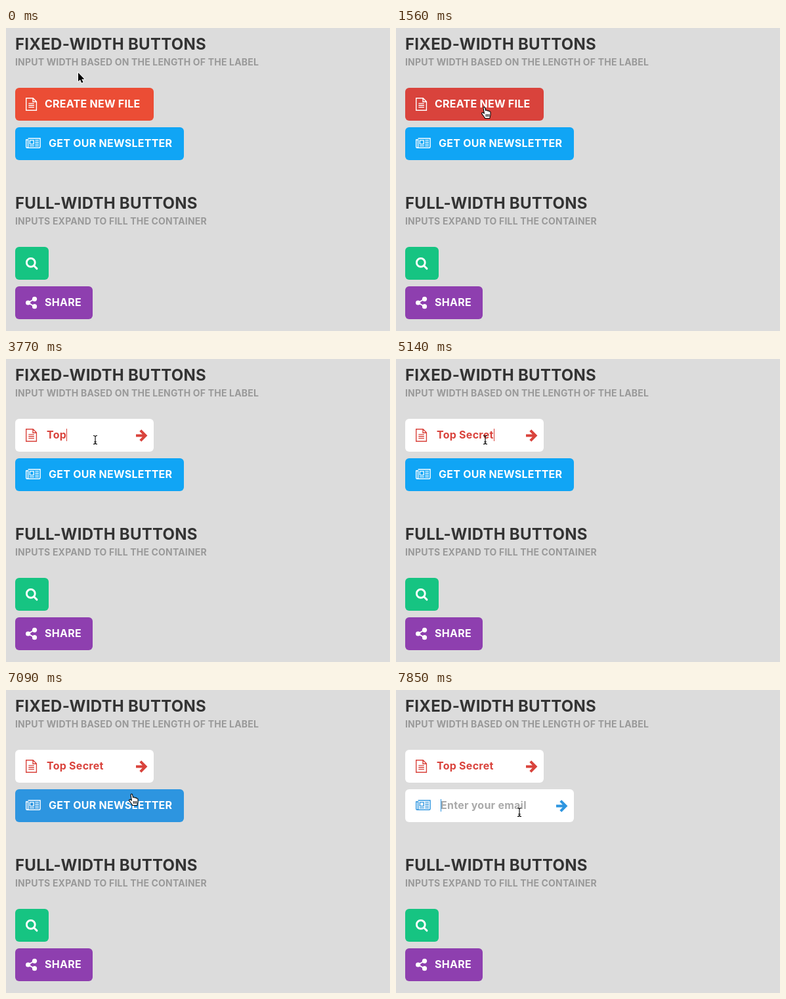
These frames come from a looping animation (585 by 461 pixels, 8000 ms). An HTML page:

```html
<!DOCTYPE html>
<html lang="en">
<head>
<meta charset="utf-8">
<title>Expanding buttons</title>
<style>
  html, body { margin: 0; width: 100%; height: 100%; overflow: hidden; background: #dcdcdc; }
  svg { display: block; }
  text { font: 700 16px Inter, "Open Sans", sans-serif; letter-spacing: .25px; fill: currentColor; white-space: pre; }
  .title { font-size: 24px; color: #333; }
  .sub { font-size: 14px; letter-spacing: .18px; color: #999; }
  .icon { fill: none; stroke: currentColor; stroke-width: 1.4; }
  .arrow { fill: none; stroke: currentColor; stroke-width: 4; }
  .button { color: #fff; }
</style>
</head>
<body>
<svg width="585" height="461" viewBox="0 0 585 461">
  <text class="title" x="14" y="32.5">FIXED-WIDTH BUTTONS</text>
  <text class="sub" x="14" y="57">INPUT WIDTH BASED ON THE LENGTH OF THE LABEL</text>
  <text class="title" x="14" y="274.5">FULL-WIDTH BUTTONS</text>
  <text class="sub" x="14" y="299">INPUTS EXPAND TO FILL THE CONTAINER</text>

  <g id="file" class="button">
    <rect class="box" x="14" y="91" width="211" height="50" rx="6"/>
    <path class="icon" d="M30.7 106.7H41.2L46.4 112V125.3H30.7ZM41 107V112.3H46.4M34.3 114.9H42.9M34.3 117.8H42.9M34.3 120.6H42.9"/>
    <text y="121"></text>
    <path class="send" fill="#d9433c" d="M188 91h31a6 6 0 0 1 6 6v38a6 6 0 0 1-6 6h-31z"/>
    <path class="arrow" d="M198 116.5H212M204.8 108.6L212.6 116.5L204.8 124.4"/>
    <rect class="caret" y="106" width="1" height="19" fill="currentColor"/>
  </g>

  <g id="news" class="button">
    <rect class="box" x="14" y="151" width="257" height="50" rx="6"/>
    <path class="icon" d="M33.6 168H52.1V180.8Q52.1 182.3 50.6 182.3H32.1Q30.7 182.3 30.7 180.8V170H33.6V180.8Q33.6 182.3 32.1 182.3M36.4 170.9H42.1V176.6H36.4ZM44.3 170.9H50M44.3 173.7H50M44.3 176.6H50M44.3 179.4H50M35.7 179.4H42.9"/>
    <text y="181"></text>
    <path class="arrow" d="M244 176.5H258M250.8 168.6L258.6 176.5L250.8 184.4"/>
    <rect class="caret" y="166" width="1" height="19" fill="currentColor"/>
  </g>

  <g class="button">
    <rect x="14" y="333" width="51" height="50" rx="6" fill="#16c482"/>
    <g fill="none" stroke="currentColor" stroke-width="2.9">
      <circle cx="37.8" cy="356.9" r="6.4"/>
      <path d="M42.2 361.3L47 366.1" stroke-linecap="round"/>
    </g>
  </g>

  <g class="button">
    <rect x="14" y="393" width="118" height="50" rx="6" fill="#8e3faf"/>
    <path d="M43.5 412.3L33.6 418L43.5 423.7" fill="none" stroke="currentColor" stroke-width="1.8"/>
    <g fill="currentColor">
      <circle cx="43.5" cy="412.3" r="3.6"/>
      <circle cx="33.6" cy="418" r="3.6"/>
      <circle cx="43.5" cy="423.7" r="3.6"/>
    </g>
    <text x="59" y="423">SHARE</text>
  </g>

  <g id="cursor">
    <path id="pointer" d="M0 0V13.2L3 10.5L5.2 15.6L7.5 14.6L5.3 9.7H9.4Z" stroke="#fff" stroke-width="1.6" paint-order="stroke"/>
    <path id="hand" transform="translate(-1 -1)" d="M-1.9-.2C-2.2-2 .1-2.4.5-.8L1.6 3.6C2 2.6 4 2.8 4.2 4.2C5 3.4 6.7 3.8 6.8 5C7.6 4.4 9 5 9 6.2V10C9 12 8 13 7.8 15.5H.6C0 13.5-3 10.5-4.2 8.4C-5 7-3 6-1.8 7.2L-.6 8.2ZM2.3 9V13M4.5 9V13M6.7 9V13" fill="#fff" stroke="#000" stroke-width="1.1" stroke-linejoin="round"/>
    <path id="beam" d="M-3-6.5Q0-6.5 0-4.5V4.5Q0 6.5-3 6.5M3-6.5Q0-6.5 0-4.5V4.5Q0 6.5 3 6.5M-1.8 3H1.8" fill="none" stroke="#000" stroke-width="1.1"/>
  </g>
</svg>
<script>
const LOOP = 8000, FILE_OPEN = 2340, NEWS_OPEN = 7850;
const $ = s => document.querySelector(s);
const show = (el, on) => el.setAttribute('visibility', on ? 'visible' : 'hidden');
const within = (t, spans) => spans.some(([a, b]) => t >= a && t < b);

const TYPED = 'Top Secret';
const KEYS = [3350, 3650, 3770, 4070, 4300, 4480, 4660, 4900, 4960, 5140];
const FILE_CARET = [[2340, 2810], [3350, 5680], [6180, 6630]];
const NEWS_CARET = [[NEWS_OPEN, LOOP]];

// Pointer moves: start, step length, steps, destination
const START = [110, 68];
const MOVES = [[1200, 60, 7, [136, 123]], [5860, 58.5, 8, [205, 129]], [6920, 56, 12, [188, 186]]];

function pointerAt(t) {
  let [x, y] = START;
  for (const [start, step, count, to] of MOVES) {
    if (t < start) break;
    const left = 1 - Math.min(1, (Math.floor((t - start) / step) + 1) / count);
    x = to[0] + (x - to[0]) * left ** 3;
    y = to[1] + (y - to[1]) * left ** 2;
  }
  return [x, y];
}

function drawField(id, o) {
  const part = s => $('#' + id + ' ' + s), text = part('text');
  part('.box').setAttribute('fill', o.open ? '#fff' : o.over ? o.dark : o.base);
  $('#' + id).style.color = o.open ? o.dark : '#fff';
  text.textContent = o.open ? o.value || o.hint : o.label;
  text.style.color = o.open && !o.value ? '#aaa' : '';
  text.setAttribute('x', o.open ? o.x + 3 : o.x);
  const width = o.value ? text.getComputedTextLength() : 0;
  part('.caret').setAttribute('x', Math.round(o.x + 3 + width));
  show(part('.caret'), o.caret);
  show(part('.arrow'), o.open);
}

function draw(t) {
  const [x, y] = pointerAt(t);
  const overFile = y >= 91 && y < 141, overNews = y >= 151 && y < 201;
  const fileOpen = t >= FILE_OPEN, newsOpen = t >= NEWS_OPEN;
  const overSend = fileOpen && overFile && x >= 188;

  drawField('file', {
    x: 59, label: 'CREATE NEW FILE', hint: 'File name', base: '#eb4d35', dark: '#d9433c',
    open: fileOpen, over: overFile, caret: within(t, FILE_CARET),
    value: TYPED.slice(0, KEYS.filter(k => t >= k).length)
  });
  drawField('news', {
    x: 65, label: 'GET OUR NEWSLETTER', hint: 'Enter your email', base: '#10a5f5', dark: '#2d95e0',
    open: newsOpen, over: overNews, caret: within(t, NEWS_CARET), value: ''
  });
  show($('#file .send'), overSend);
  $('#file .arrow').style.color = overSend ? '#fff' : '';

  const beam = overFile && fileOpen && !overSend || overNews && newsOpen;
  const hand = (overFile || overNews) && !beam;
  show($('#beam'), beam);
  show($('#hand'), hand);
  show($('#pointer'), !beam && !hand);
  $('#cursor').setAttribute('transform', `translate(${Math.round(x)} ${Math.round(y)})`);
}

function tick() {
  draw(performance.now() % LOOP);
  requestAnimationFrame(tick);
}
tick();
</script>
</body>
</html>
```
